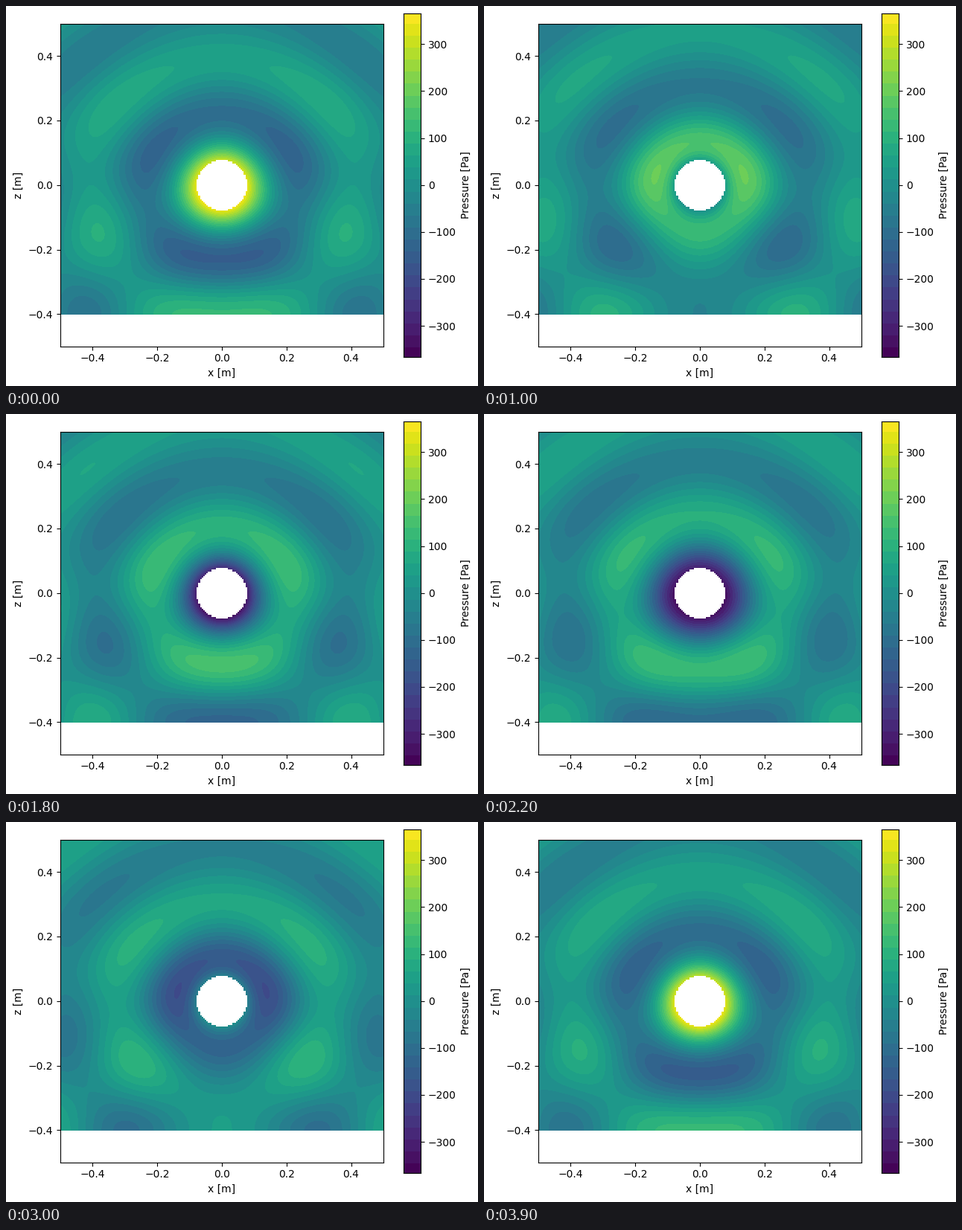
These frames come from a looping animation (634x511 px, 4000 ms). A matplotlib script:

```python
import numpy as np
import matplotlib.pyplot as plt
from matplotlib.animation import FuncAnimation
from matplotlib.colors import BoundaryNorm, ListedColormap

W, H, DPI = 634, 511, 100
FRAMES, INTERVAL = 40, 100

# Monopole above a rigid floor, modelled with a mirrored source
WAVELENGTH = 0.343
STRENGTH = 25.0
PHASE_RADIUS = 0.075
HOLE_RADIUS = 0.0775
FLOOR = -0.4
P_MAX = 366

SIZE = 434
CELL = 1 / 199


def wave(r):
    """Complex pressure of an outgoing spherical wave."""
    turns = (r - PHASE_RADIUS) / WAVELENGTH
    return STRENGTH / r * np.exp(2j * np.pi * turns)


def snap(v):
    """Centre of the coarse cell that holds each coordinate."""
    return np.round(v / CELL) * CELL


axis = (np.arange(SIZE) + 0.5) / SIZE - 0.5
x, z = np.meshgrid(axis, axis)
hidden = (np.hypot(snap(x), snap(z)) < HOLE_RADIUS) | (z < FLOOR)
field = wave(np.hypot(x, z)) + wave(np.hypot(x, z - 2 * FLOOR))


def pressure(frame):
    turn = np.exp(-2j * np.pi * frame / FRAMES)
    return np.ma.masked_array((field * turn).real, hidden)


# Stepped colours
levels = 25.6 * (np.arange(-15, 15) + 0.5) - 0.7
middles = (levels[:-1] + levels[1:]) / 2
shades = plt.get_cmap("viridis")(np.clip(0.5 + middles / (2 * P_MAX), 0, 1))
cmap = ListedColormap(shades)
norm = BoundaryNorm(levels, cmap.N)

fig = plt.figure(figsize=(W / DPI, H / DPI), dpi=DPI, facecolor="white")


def add_axes(left, bottom, width, height):
    return fig.add_axes([left / W, bottom / H, width / W, height / H])


ax = add_axes(72.9, 53.28, SIZE, SIZE)
image = ax.imshow(pressure(0), cmap=cmap, norm=norm, origin="lower",
                  extent=(-0.5, 0.5, -0.5, 0.5), interpolation="nearest",
                  aspect="auto")
ticks = [-0.4, -0.2, 0, 0.2, 0.4]
ax.set_xticks(ticks)
ax.set_yticks(ticks)
ax.set_xlabel("x [m]")
ax.set_ylabel("z [m]")

bar = add_axes(534.02, 39.28, 23.1, 462)
ramp = np.linspace(-P_MAX, P_MAX, 462)[:, None]
bar.imshow(ramp, cmap=cmap, norm=norm, origin="lower",
           extent=(0, 1, -P_MAX, P_MAX), interpolation="nearest",
           aspect="auto")
bar.set_xticks([])
bar.set_yticks(range(-300, 301, 100))
bar.yaxis.tick_right()
bar.yaxis.set_label_position("right")
bar.set_ylabel("Pressure [Pa]")


def update(frame):
    image.set_data(pressure(frame))
    return [image]


anim = FuncAnimation(fig, update, frames=FRAMES, interval=INTERVAL,
                     repeat=True, repeat_delay=0, blit=False)
plt.show()
```
